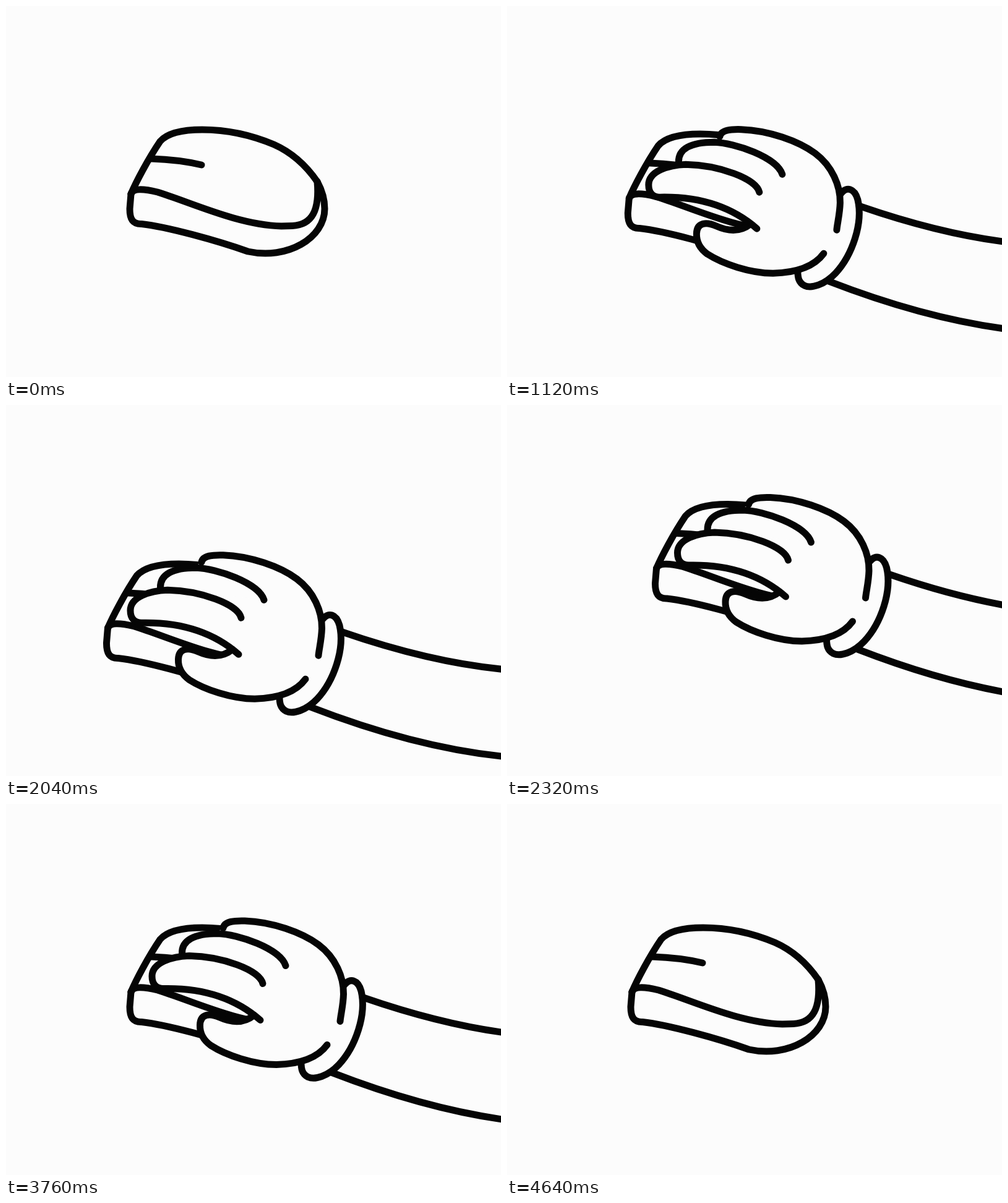
An HTML page with a canvas that plays this animation: 800x600 px, repeating every 5.48 s.

```html
<!DOCTYPE html>
<html lang="en">
<head>
<meta charset="utf-8">
<title>Hand and mouse</title>
<style>
  html, body { margin: 0; width: 100%; height: 100%; overflow: hidden; background: #fcfcfc; }
  canvas { display: block; }
</style>
</head>
<body>
<canvas id="stage" width="800" height="600"></canvas>
<script>
const ctx = document.getElementById('stage').getContext('2d');
const LOOP = 5480, INK = '#050505', PAPER = '#fcfcfc';

// Moves: [start, end, x, y, easing power]
const HAND_START = [572, 110.5];
const HAND_MOVES = [
  [80, 440, -4.5, -12.5, 2],
  [440, 840, 0, .5, 1.7],
  [1000, 1360, -40, 60.5, 2.6],
  [1960, 2320, 39.5, -39, 2.6],
  [3000, 3360, 0, .5, 2.6],
  [4000, 4240, -9, -3.5, 2],
  [4240, 4640, 575, 192, 1.8]
];
const MOUSE_MOVES = [
  [1010, 1370, -40, 60, 3],
  [1970, 2330, 39.5, -39.5, 3],
  [3010, 3370, 0, 0, 3]
];
// Clicks: [start, count]
const CLICK = 200, PRESS = 80;
const CLICKS = [[1360, 3], [2360, 2], [3360, 2]];

const BACK = 'M351 200C353 189 370 188 386 188.5C430 190 478 207 505 227C533 248 546 280 545.5 307C545 325 541 340 540 351';
const THUMB = '519 389C503 411 475 420 437 421C400 421 356 406 331 390C320 382 313 372 313.5 357C314 338 330 338 345 344.5C364 353 384 355 401 341';
const CUFF = 'M547 292C556 280 569 284 574 302C583 340 565 392 538 421C520 440 499 446 488 441C478 436 477 427 477 417';
const ARM_TOP = 'M579 313C660 341 760 368 860 375';
const ARM_BOTTOM = '860 516C745 507 630 474 527 434';

function ease(u, p) {
  u = Math.min(1, Math.max(0, u));
  return u < .5 ? (2 * u) ** p / 2 : 1 - (2 - 2 * u) ** p / 2;
}

function place(t, [x, y], moves) {
  for (const [start, end, toX, toY, p] of moves) {
    const e = ease((t - start) / (end - start), p);
    x += (toX - x) * e;
    y += (toY - y) * e;
  }
  return [x, y];
}

function pressure(t) {
  for (const [start, count] of CLICKS) {
    const u = t - start;
    if (u < 0 || u >= count * CLICK) continue;
    const v = u % CLICK;
    return ease(v < PRESS ? v / PRESS : (CLICK - v) / (CLICK - PRESS), 2);
  }
  return 0;
}

const stroke = d => ctx.stroke(new Path2D(d));
const fill = d => ctx.fill(new Path2D(d));

function at([x, y], draw, k) {
  ctx.save();
  ctx.translate(x, y);
  draw(k);
  ctx.restore();
}

function drawMouse(k) {
  stroke(`M${202 + 8 * k} ${304 - 3 * k}C${210 + 2 * k} ${285 - 2 * k} ${230 - 4 * k} ${247 - 2 * k} 249 219` +
    'C262 204 288 200 317 200C362 200 402 211 433 224C460 236 483 255 503 284');
  stroke('M503 284C509 295 515 310 515 328C515 375 455 411 391 397' +
    'C340 379 260 357 219 352.5C205 353 200 345 200 328L202 304');
  stroke(`M202 304C205 ${295 + 5 * k} 220 ${295 + 5 * k} 245 ${301 + 4 * k}` +
    'C300 318 375 354 445 356L463 355.5C495 354 507 330 503 284');
  stroke(`M${235 - 4 * k} ${247 + 7 * k}C265 ${248 + 3 * k} 295 252 316 257`);
}

function drawHand(k) {
  const middle = `M284.5 ${241 + 3 * k}C284 220 304 209 342 209C375 210 443 233 452 261`;
  const index = `M415 290C410 268 350 ${246 + 4 * k} 296 ${245 + 4 * k}` +
    `C${268 + k} ${246 + 5 * k} ${236 + 3 * k} ${256 + 8 * k} ${236 + 3 * k} ${278 + 8 * k}` +
    `C${236 + 3 * k} ${291 + 7 * k} 243 ${298 + 6 * k} 254 ${298 + 6 * k}` +
    `C300 ${297 + 7 * k} 360 ${304 + 5 * k} 411 349`;
  [
    `${ARM_TOP}L${ARM_BOTTOM}Z`,
    CUFF,
    `${BACK}L${THUMB}L296 249L285 243Z`,
    middle,
    index
  ].forEach(fill);
  [ARM_TOP, 'M' + ARM_BOTTOM, CUFF, BACK, 'M' + THUMB, middle, index].forEach(stroke);
}

function frame(now) {
  const t = now % LOOP, k = pressure(t);
  ctx.fillStyle = PAPER;
  ctx.fillRect(0, 0, 800, 600);
  ctx.strokeStyle = INK;
  ctx.lineWidth = 11;
  ctx.lineCap = ctx.lineJoin = 'round';
  at(place(t, [0, 0], MOUSE_MOVES), drawMouse, k);
  at(place(t, HAND_START, HAND_MOVES), drawHand, k);
}

const begin = performance.now();
function tick() {
  frame(performance.now() - begin);
  requestAnimationFrame(tick);
}
tick();
</script>
</body>
</html>
```
